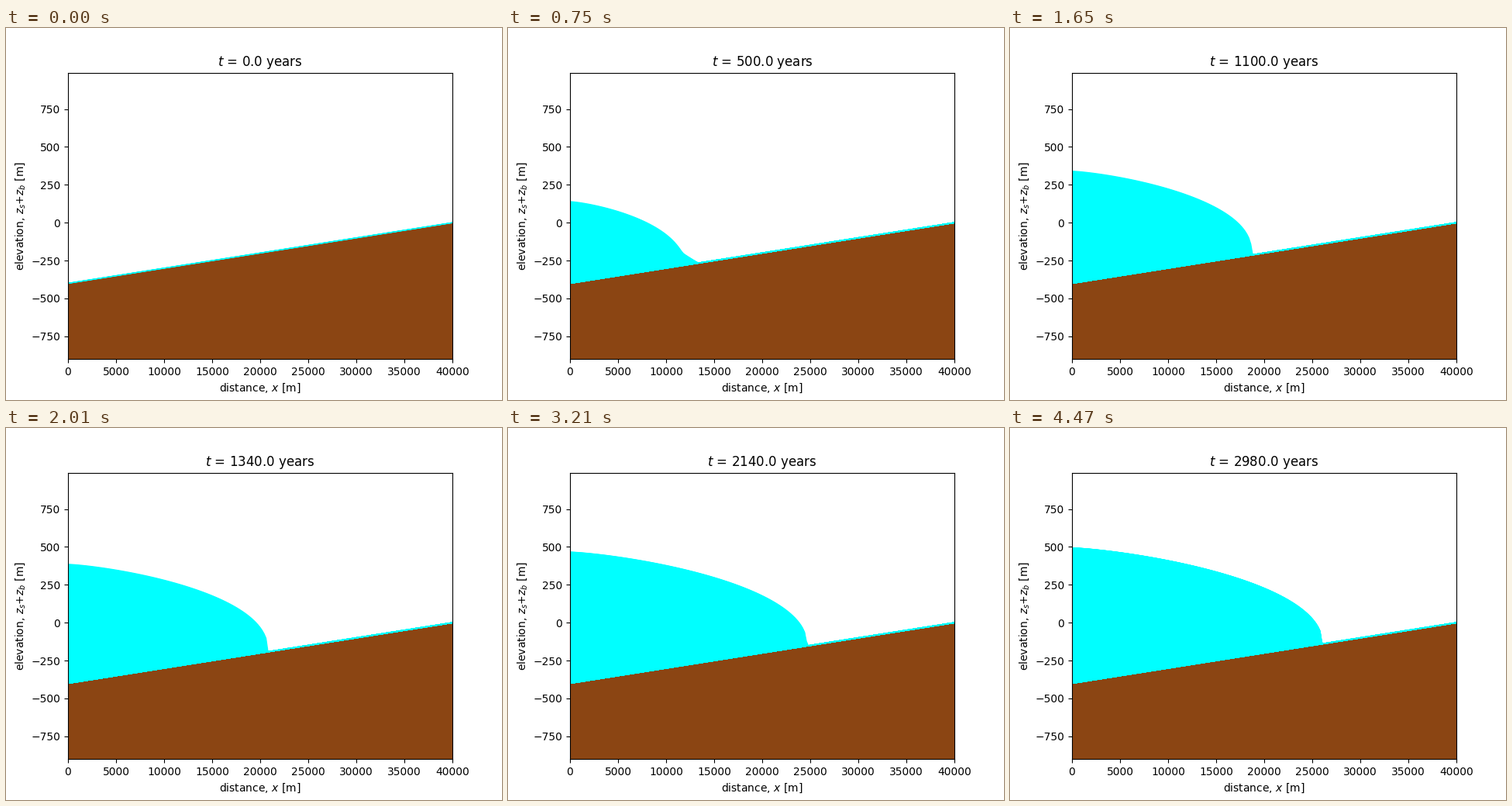
A matplotlib script that plays this animation: 640x480 px, repeating every 4.5 s.

```python
import numpy as np
import matplotlib.pyplot as plt
from matplotlib.animation import FuncAnimation
from matplotlib.collections import PolyCollection

FRAMES, INTERVAL = 150, 30
YEARS_PER_FRAME, DT = 20, 1.0
DX, X_END = 200.0, 40000.0
FLOW = 2.3e-5          # 2A(rho g)^3 / 5, per m^3 per year
TRAIL = 50             # outlines kept from earlier frames

x = np.arange(0, 30000 + DX, DX)
bed = 0.01 * x - 400
balance = 1e-4 * (X_END / 3 - x)
idx = np.arange(len(x) - 1)
left_weight = np.ones(len(x) - 1)
left_weight[0] = 2     # half cell at the ice divide


def step(h):
    """Advance the shallow-ice thickness by one linearly implicit step."""
    slope = np.diff(h + bed) / DX
    diff = FLOW * ((h[1:] + h[:-1]) / 2) ** 5 * slope ** 2
    flux = -diff * slope / DX
    rate = balance.copy()
    rate[:-1] -= left_weight * flux
    rate[1:] += flux

    k = 3 * diff * DT / DX ** 2
    m = np.eye(len(x))
    m[idx, idx] += left_weight * k
    m[idx, idx + 1] -= left_weight * k
    m[idx + 1, idx + 1] += k
    m[idx + 1, idx] -= k
    return np.maximum(h + np.linalg.solve(m, DT * rate), 0)


def run_model():
    h = np.zeros(len(x))
    history = [h]
    for _ in range(FRAMES - 1):
        for _ in range(int(YEARS_PER_FRAME / DT)):
            h = step(h)
        history.append(h)
    return np.maximum.accumulate(history, axis=0)


def outline(h):
    top = np.column_stack([x, bed + h])
    base = np.column_stack([x, bed])[::-1]
    return np.vstack([top, [[X_END, 0]], base])


outlines = [outline(h) for h in run_model()]

fig, ax = plt.subplots(figsize=(6.4, 4.8), dpi=100)
ax.set_xlim(0, X_END)
ax.set_ylim(-900, 990)
ax.set_xlabel("distance, $x$ [m]")
ax.set_ylabel("elevation, $z_s$+$z_b$ [m]")
title = ax.set_title("")

ax.fill_between([0, X_END], [-400, 0], -900, color="saddlebrown")
ice = PolyCollection([], facecolor="cyan", linewidth=0)
# Overlaid edges build up the hard rim of the ice
rims = PolyCollection([], facecolor="none", edgecolor="cyan", linewidth=1)
ax.add_collection(ice, autolim=False)
ax.add_collection(rims, autolim=False)


def update(i):
    ice.set_verts([outlines[i]])
    rims.set_verts(outlines[max(0, i + 1 - TRAIL):i + 1])
    title.set_text(f"$t$ = {i * YEARS_PER_FRAME:.1f} years")
    return ice, rims, title


anim = FuncAnimation(fig, update, frames=FRAMES, interval=INTERVAL,
                     init_func=lambda: update(0), repeat=True, repeat_delay=0)
plt.show()
```
